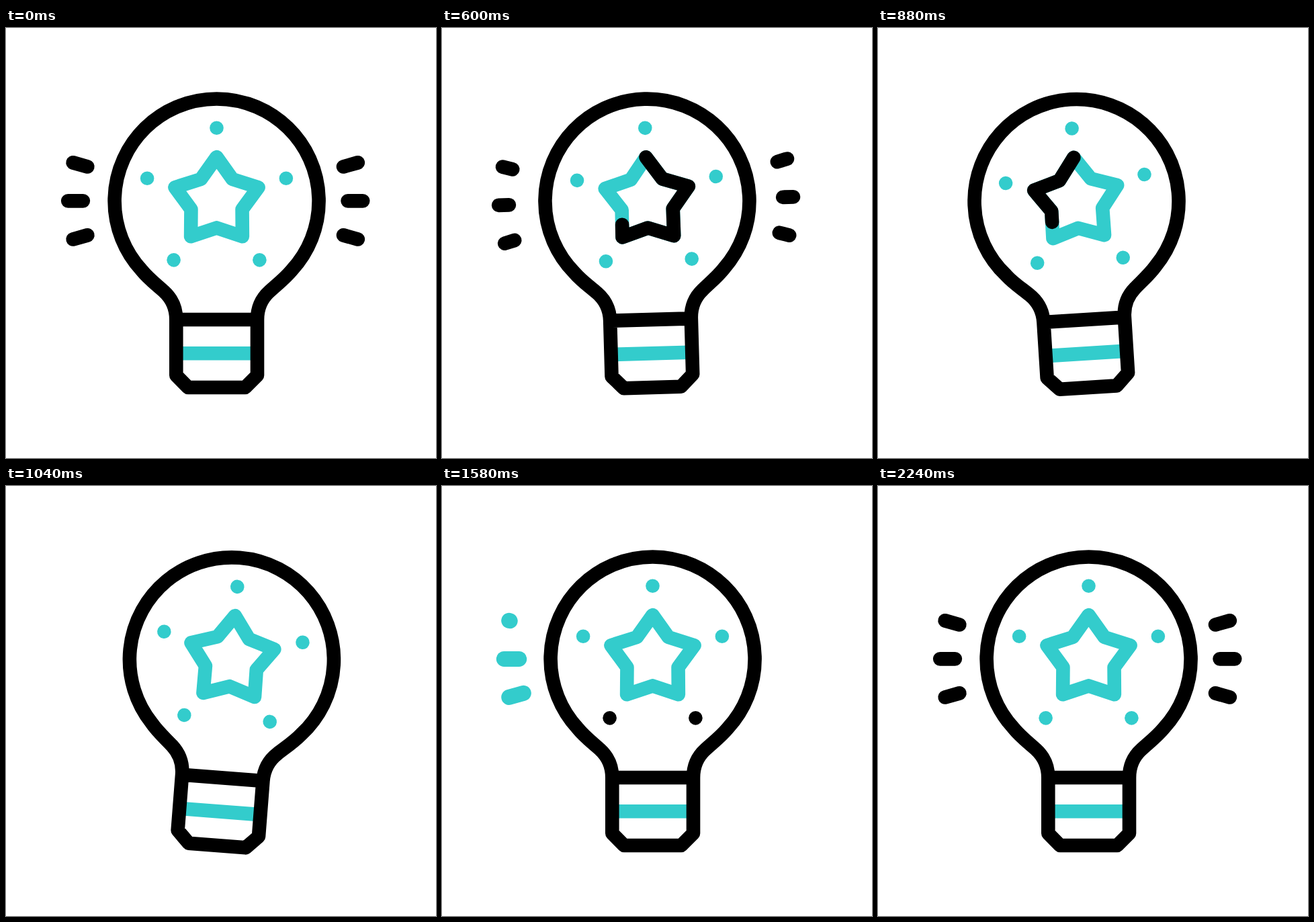
Recreate the animation shown at these times as an HTML page. Size 640 by 640 pixels, loop 2.52 s.

```html
<!DOCTYPE html>
<html lang="en">
<head>
<meta charset="utf-8">
<title>Bright idea</title>
<style>
  html, body { margin: 0; width: 100%; height: 100%; overflow: hidden; background: #fff; }
  svg { display: block; width: 100vw; height: 100vh; }
  .line { fill: none; stroke-width: 20.6; stroke-linecap: round; stroke-linejoin: round; }
  .dark { stroke: #000; }
  .teal { stroke: #3cc; }
</style>
</head>
<body>
<svg viewBox="0 0 640 640">
  <g id="lamp">
    <path class="line teal" style="stroke-linecap:butt" d="M258 484.3H370"/>
    <path class="line dark" d="M253.3 434C253.3 416 247 403 235 392C224 382 212 373 202.3 361
      A152 152 0 1 1 424.9 361C415 373 403 382 392.2 392C380 403 374 416 374 434
      V517L356 535H271L253.3 517ZH374"/>
    <path id="star" class="line teal"/>
    <path id="trace" class="line dark" pathLength="1"/>
    <g id="dots"></g>
    <g id="rays"></g>
  </g>
</svg>
<script>
const LOOP = 2520, STEP = 20;
const DARK = "#000", TEAL = "#3cc";
const CX = 313.5, CY = 257.4, FOOT = 545;
const $ = id => document.getElementById(id);

function add(parent, tag, attrs) {
  const el = document.createElementNS("http://www.w3.org/2000/svg", tag);
  for (const key in attrs) el.setAttribute(key, attrs[key]);
  return parent.appendChild(el);
}

const ramp = (t, from, length) => Math.min(1, Math.max(0, (t - from) / length));
const ease = f => (1 - Math.cos(Math.PI * f)) / 2;

// point at a share of a full turn, clockwise from the top
function polar(radius, turn) {
  const a = 2 * Math.PI * turn;
  return [CX + radius * Math.sin(a), CY - radius * Math.cos(a)];
}

// Star: tips and notches alternate
const corners = Array.from({ length: 11 }, (_, i) => polar(i % 2 ? 40 : 65.3, i / 10));
const outline = "M" + corners.join("L");
$("star").setAttribute("d", outline + "Z");
$("trace").setAttribute("d", outline);

const dots = Array.from({ length: 5 }, (_, i) => {
  const [cx, cy] = polar(108.7, i / 5);
  return add($("dots"), "circle", { cx, cy, r: 10.3 });
});

// Rays: three per side, fanned around the middle one; right side first
const rays = [];
[1, -1].forEach((side, s) => {
  [-1, 1, 0].forEach((row, order) => {
    const tilt = row * Math.PI / 11.5;
    rays.push({
      x: 311.7 + side * (208.2 - 7 * Math.abs(row)),
      y: CY + 54 * row,
      dx: side * 11.2 * Math.cos(tilt),
      dy: 11.2 * Math.sin(tilt),
      draw: 1125 + 146 * s + 55 * order,
      wipe: 1378 + 146 * s + 58 * order,
      el: add($("rays"), "line", { class: "line" })
    });
  });
});

// Rise to one side, rock back and forth, settle
function angle(t) {
  const peak = 390, beat = 156.3, settle = peak + 5 * beat;
  if (t < peak) return 5 * ease(ramp(t, 260, peak - 260));
  if (t < settle) return 5 - 9 * ease((t - peak) / beat);
  return -4 * (1 - ease(ramp(t, settle, 99)));
}

function showRay(ray, t) {
  const recolored = t >= 1000 && t < 1850;
  let from, to;
  if (t < 1000) [from, to] = [ramp(t, 510, 295), 1];
  else if (recolored) [from, to] = [ramp(t, ray.wipe, 60), ramp(t, ray.draw, 90)];
  else [from, to] = [0, ramp(t, 1910, 325)];

  const { el, x, y, dx, dy } = ray;
  el.style.display = to > from ? "" : "none";
  el.style.stroke = recolored ? TEAL : DARK;
  el.style.strokeWidth = recolored ? 23 : 20.8;
  [from, to].forEach((f, i) => {
    el.setAttribute("x" + (i + 1), x + dx * (2 * f - 1));
    el.setAttribute("y" + (i + 1), y + dy * (2 * f - 1));
  });
}

function showTrace(t) {
  const from = ramp(t, 686, 294), to = ramp(t, 410, 294);
  const trace = $("trace");
  trace.style.display = to > from ? "" : "none";
  trace.setAttribute("stroke-dasharray", `${to - from} 3`);
  trace.setAttribute("stroke-dashoffset", -from);
}

function render(t) {
  $("lamp").setAttribute("transform", `rotate(${angle(t)} ${CX} ${FOOT})`);
  showTrace(t);
  dots.forEach((dot, i) => {
    const age = t - 1090 - 124 * i;
    dot.style.fill = age >= 0 && age < 254 ? DARK : TEAL;
  });
  rays.forEach(ray => showRay(ray, t));
}

const start = performance.now();
function tick() {
  const t = (performance.now() - start) % LOOP;
  render(Math.floor(t / STEP) * STEP);
  requestAnimationFrame(tick);
}
tick();
</script>
</body>
</html>
```
